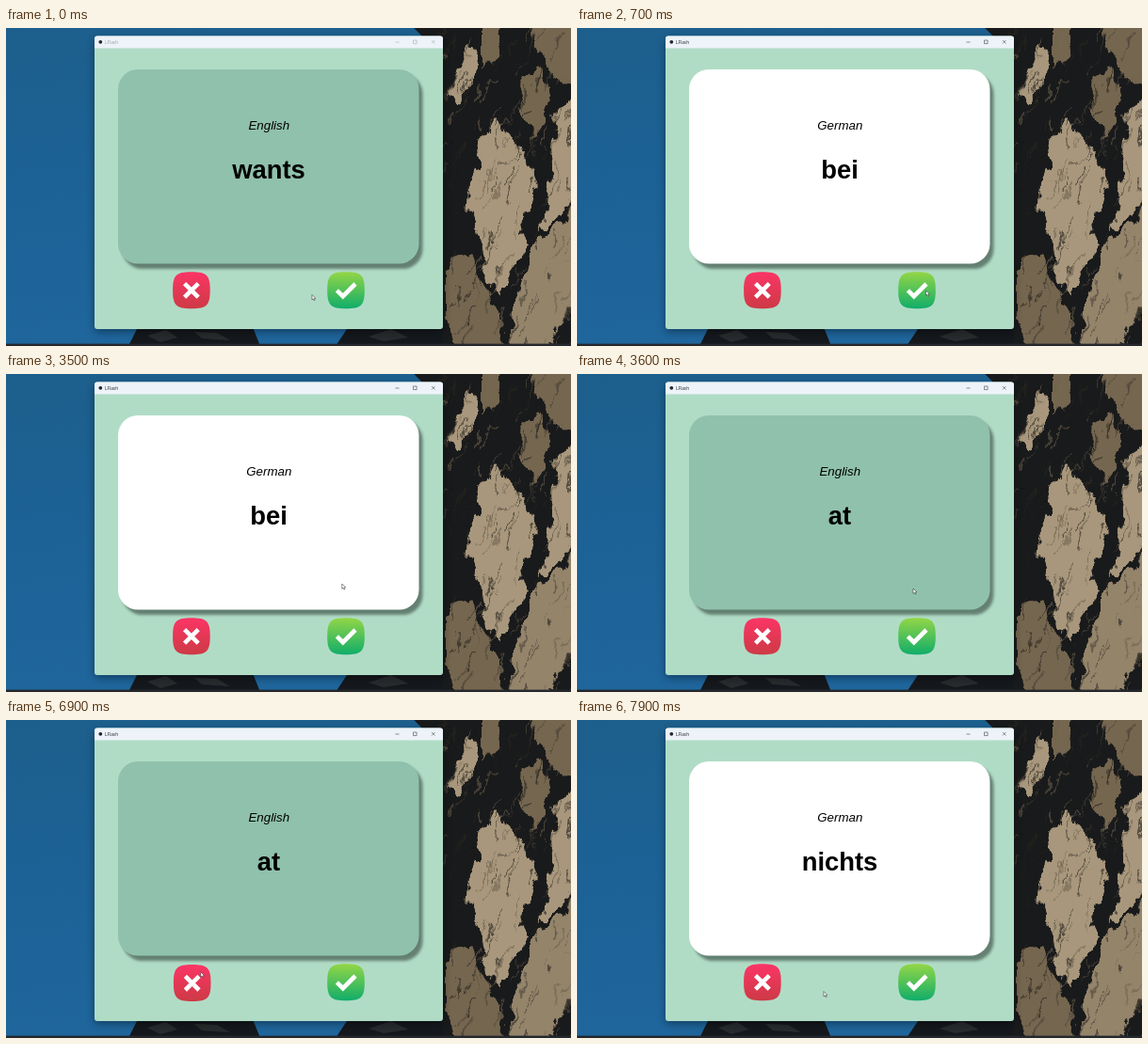
Animation, 600 px wide and 338 px high, one loop 8 s. Source, as an HTML page:

```html
<!DOCTYPE html>
<html lang="en">
<head>
<meta charset="utf-8">
<title>Flash cards</title>
<style>
html, body { margin: 0; width: 100%; height: 100%; overflow: hidden; background: #1b6297; }
svg { display: block; width: 100vw; height: 100vh; }
text { font-family: "Liberation Sans", Arial, sans-serif; }
.title { font: 4.8px "Open Sans", sans-serif; }
.lang { font-size: 13.3px; font-style: italic; text-anchor: middle; }
.word { font-size: 27.4px; font-weight: bold; text-anchor: middle; }
</style>
</head>
<body>
<svg viewBox="0 0 600 338">
  <defs>
    <linearGradient id="sky" x2="0.15" y2="1">
      <stop offset="0" stop-color="#1d5f8c"/><stop offset="0.5" stop-color="#1c6296"/><stop offset="1" stop-color="#1f669d"/>
    </linearGradient>
    <linearGradient id="red" x2="0" y2="1">
      <stop offset="0" stop-color="#fb3566"/><stop offset="1" stop-color="#cd3a45"/>
    </linearGradient>
    <linearGradient id="green" x2="0" y2="1">
      <stop offset="0" stop-color="#93d646"/><stop offset="1" stop-color="#10ad6a"/>
    </linearGradient>
    <filter id="soft" x="-10%" y="-10%" width="120%" height="120%"><feGaussianBlur stdDeviation="1.5"/></filter>
    <filter id="wide" x="-10%" y="-10%" width="120%" height="120%"><feGaussianBlur stdDeviation="5"/></filter>
    <filter id="rough" filterUnits="userSpaceOnUse" x="420" y="-20" width="200" height="380">
      <feTurbulence type="fractalNoise" baseFrequency="0.07 0.04" numOctaves="4" seed="4"/>
      <feDisplacementMap in="SourceGraphic" scale="20" xChannelSelector="R" yChannelSelector="G"/>
    </filter>
    <path id="tile" d="M0 19.5C0 3.5 3.5 0 19.8 0S39.6 3.5 39.6 19.5 36.1 39 19.8 39 0 35.5 0 19.5Z"/>
    <clipPath id="ridge"><path id="edge" d="M433 0L442 9L464 50V338H600V0Z"/></clipPath>
  </defs>

  <rect width="600" height="338" fill="url(#sky)"/>
  <path d="M130 338L140 318L205 312L262 318L270 338ZM350 338L362 320L385 310H470V338Z" fill="#15191d"/>
  <path d="M150 327l20 -6 12 8 -18 5ZM200 323l24 1 14 8 -30 -2ZM385 328l24 -8 18 9 -26 4Z" fill="#292c2e"/>
  <g clip-path="url(#ridge)">
    <use href="#edge" fill="#191a1b"/>
    <g filter="url(#rough)">
      <path d="M556 -9H610V66L583 55L570 34ZM545 70L562 40L578 62L574 100L560 118ZM506 -8L526 0L520 28L506 46ZM464 255L490 240L511 275L524 310L530 345H482L464 300Z" fill="#75664f"/>
      <path d="M521 98L535 114L556 145L564 167L556 193L546 217L551 236L537 257L524 289L514 273L503 225L493 199L495 167L503 140L501 119ZM586 82L610 71V172L583 205L570 215L578 150ZM490 20L500 23L494 58L478 82L470 70Z" fill="#a8977b"/>
      <path d="M560 232L584 210L610 180V285L588 318L574 345H534L538 300Z" fill="#94846b"/>
      <g id="strata" fill="none" stroke-linecap="round"></g>
    </g>
  </g>
  <rect y="335.6" width="600" height="2.4" fill="#25282d"/>

  <rect x="94" y="12" width="370" height="311" rx="4" opacity="0.38" filter="url(#wide)"/>
  <rect x="94" y="8.6" width="370" height="311.4" rx="3" fill="#b0dcc6"/>
  <path d="M94 21.5V11.6Q94 8.6 97 8.6H461Q464 8.6 464 11.6V21.5Z" fill="#edf3f9"/>
  <circle cx="100.3" cy="14.8" r="1.9" fill="#23272d"/>
  <g id="caption">
    <text class="title" x="105" y="16.5">LFlash</text>
    <path d="M413.5 15H417.5M432.5 13H436.1V16.6H432.5ZM452 13L455.5 16.5M455.5 13L452 16.5" fill="none" stroke="currentColor" stroke-width="0.5"/>
  </g>

  <rect x="123.5" y="49" width="319" height="207" rx="21" fill="#26352e" opacity="0.55" filter="url(#soft)"/>
  <rect id="card" x="119" y="44" width="319.5" height="206.5" rx="21"/>
  <text id="lang" class="lang" x="279.3" y="108.2"></text>
  <text id="word" class="word" x="279" y="160"></text>

  <g id="no">
    <use href="#tile" x="177.1" y="259.3" fill="url(#red)"/>
    <path d="M189.6 271.6L204.2 286.2M204.2 271.6L189.6 286.2" stroke="#fff" stroke-width="4.6"/>
  </g>
  <g id="yes">
    <use href="#tile" x="341.2" y="259.3" fill="url(#green)"/>
    <path d="M351.4 278.8L357.8 285.2L371 272" fill="none" stroke="#fff" stroke-width="4.6"/>
  </g>
  <path id="pointer" d="M0 0V5.4L1.3 4.3L2.2 6.2L3.1 5.8L2.2 3.9H3.9Z" fill="#fff" stroke="#333" stroke-width="0.55"/>
</svg>
<script>
const LOOP = 8000, STEP = 100;
const $ = id => document.getElementById(id);

// start time, language, word
const cards = [
  [0, "English", "wants"],
  [600, "German", "bei"],
  [3600, "English", "at"],
  [7000, "German", "nichts"]
];

// time, x, y of the pointer tip
const path = [
  [0, 325, 283.5], [300, 344, 284], [500, 369, 280], [700, 370.5, 279],
  [1500, 370.5, 279], [1700, 396, 277], [1800, 390, 256], [2000, 356.8, 223],
  [3500, 356.8, 223], [3600, 357, 228], [4300, 358, 272], [4400, 357, 269],
  [4600, 357, 269], [4800, 340, 263], [5100, 289.3, 247.4], [5500, 260, 240.5],
  [6000, 232, 251], [6400, 205, 265.5], [6800, 206.8, 267.8],
  [7300, 206.8, 267.8], [7600, 238, 281], [7900, 262, 288.5]
];

let seed = 11;
const rand = () => (seed = seed * 16807 % 2147483647) / 2147483647;
const span = (a, b) => a + rand() * (b - a);

// thin cracks and ledges running down the rock
function drawStrata() {
  const tones = ["#6d604f", "#2a2622", "#1d1c1b", "#4a4238"];
  let out = "";
  for (let i = 0; i < 150; i++) {
    const x = span(466, 608), y = span(-10, 338), len = span(8, 24);
    const dx = -len * span(0.1, 0.7);
    const tone = tones[Math.floor(rand() * tones.length)];
    out += `<path d="M${x} ${y}l${dx} ${len}" stroke="${tone}" stroke-width="${span(0.6, 2.4)}" opacity="0.6"/>`;
  }
  $("strata").innerHTML = out;
}

function pointerAt(t) {
  const i = path.findIndex(p => p[0] > t);
  if (i < 0) return path[path.length - 1].slice(1);
  const [t0, x0, y0] = path[i - 1], [t1, x1, y1] = path[i];
  const k = (t - t0) / (t1 - t0);
  return [x0 + (x1 - x0) * k, y0 + (y1 - y0) * k];
}

function press(id, down) {
  $(id).setAttribute("transform", down ? "translate(0.8 0.8)" : "");
}

function render(t) {
  const [, lang, word] = cards.filter(c => c[0] <= t).pop();
  $("lang").textContent = lang;
  $("word").textContent = word;
  $("card").setAttribute("fill", lang === "German" ? "#fff" : "#90c1ad");

  const ink = t < 500 ? "#999ea3" : "#202327";
  $("caption").setAttribute("fill", ink);
  $("caption").setAttribute("color", ink);

  press("yes", t >= 500 && t < 600);
  press("no", t >= 6800 && t < 7000);
  $("pointer").setAttribute("transform", `translate(${pointerAt(t).join(" ")})`);
}

drawStrata();
const start = performance.now();
function tick() {
  const t = (performance.now() - start) % LOOP;
  render(Math.floor(t / STEP) * STEP);
  requestAnimationFrame(tick);
}
tick();
</script>
</body>
</html>
```
